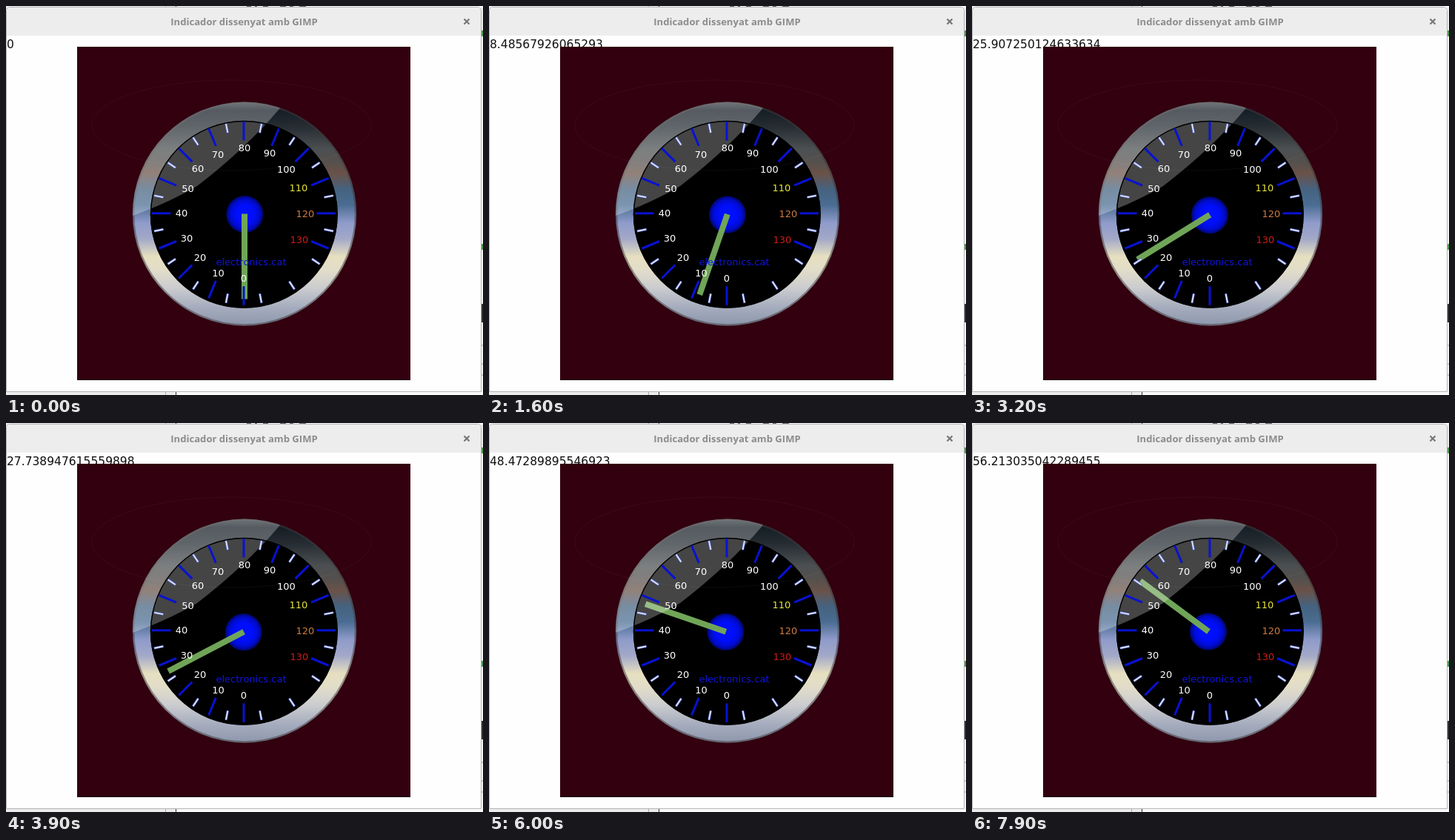
An HTML page for the animation above (8 s loop, 644 by 525 pixels).

```html
<!DOCTYPE html>
<html lang="ca">
<head>
<meta charset="utf-8">
<title>Indicador</title>
<style>
html, body { margin: 0; width: 100%; height: 100%; overflow: hidden; background: #eee; }
svg { display: block; width: 644px; height: 525px; }
.title { font: bold 13.1px "Open Sans", "Noto Sans", sans-serif; fill: #8b8c8b; text-anchor: middle; }
.value { font: 15.5px "DejaVu Sans", sans-serif; fill: #111; }
.dial { font: 13px "DejaVu Sans", sans-serif; }
#labels { text-anchor: middle; fill: #fff; }
</style>
</head>
<body>
<svg viewBox="0 0 644 525" xmlns="http://www.w3.org/2000/svg">
  <defs>
    <linearGradient id="chrome" gradientUnits="userSpaceOnUse" x1="0" y1="129" x2="0" y2="432">
      <stop offset="0" stop-color="#3a4448"/>
      <stop offset=".04" stop-color="#161e26"/>
      <stop offset=".11" stop-color="#252c32"/>
      <stop offset=".21" stop-color="#4b4f51"/>
      <stop offset=".27" stop-color="#55504d"/>
      <stop offset=".32" stop-color="#6a5248"/>
      <stop offset=".39" stop-color="#45627f"/>
      <stop offset=".46" stop-color="#4a6c92"/>
      <stop offset=".54" stop-color="#8f9bca"/>
      <stop offset=".61" stop-color="#a2a8c8"/>
      <stop offset=".69" stop-color="#e6dfc0"/>
      <stop offset=".75" stop-color="#e2ddc9"/>
      <stop offset=".83" stop-color="#cbcccf"/>
      <stop offset=".92" stop-color="#a4abbd"/>
      <stop offset="1" stop-color="#8d96ab"/>
    </linearGradient>
    <radialGradient id="hub">
      <stop offset="0" stop-color="#0010ff"/>
      <stop offset=".5" stop-color="#000efa"/>
      <stop offset=".8" stop-color="#000bcc"/>
      <stop offset="1" stop-color="#000668"/>
    </radialGradient>
    <clipPath id="rim"><circle cx="322" cy="280.5" r="151"/></clipPath>
  </defs>

  <!-- desktop behind the window -->
  <rect width="644" height="525" fill="#ececec"/>
  <path d="M230 0h414v2H230zM230 520h414v5H230z" fill="#fafafa"/>
  <path d="M215.500 0v3M215.500 520v5" stroke="#aaa"/>
  <path d="M229.500 0v2M229.500 520v5" stroke="#333"/>
  <path d="M325 .5h6M336 .5h3M347 .5h7M370 .5h8M383 .5h5M396 .5h9" stroke="#666"/>
  <path d="M642 40h2v480h-2z" fill="#f5f5f5"/>
  <path d="M642 33h2v8h-2zM642 321h2v8h-2z" fill="#4c9a4c"/>
  <path d="M642 402h2v25h-2z" fill="#333"/>
  <path d="M642 458h2M642 483h2M642 498h2" stroke="#999"/>

  <!-- window -->
  <path d="M.5 520.500V7q0-5.500 5.500-5.500h630q5.500 0 5.500 5.500v513.500z" fill="#fffeff" stroke="#b4b4b4"/>
  <path d="M1 40V7q0-5 5-5h630q5 0 5 5v33z" fill="#ededed"/>
  <text class="title" x="321.500" y="26">Indicador dissenyat amb GIMP</text>
  <path d="M618.500 17.500l7 7m0-7l-7 7" stroke="#777" stroke-width="2.200"/>
  <text class="value" id="value" x="1" y="57">0</text>

  <!-- gauge -->
  <rect x="96" y="55" width="450" height="450" fill="#32000f"/>
  <path d="M96 504.500h450" stroke="#120008"/>
  <circle cx="322" cy="280.500" r="151" fill="url(#chrome)"/>
  <circle cx="322" cy="280.500" r="150" fill="none" stroke="#40383c" stroke-opacity=".5" stroke-width="2.500"/>
  <circle cx="321.300" cy="281.300" r="126.500"/>
  <g id="needle">
    <circle cx="322.300" cy="281" r="25" fill="url(#hub)"/>
    <rect x="318" y="280.500" width="8" height="115" fill="#70a558"/>
  </g>
  <path clip-path="url(#rim)" d="M165 285Q215 268 258 243Q322 194 369 139L380 120H165z" fill="#fff" fill-opacity=".27"/>
  <circle cx="321.300" cy="281.300" r="125.800" fill="none" stroke="#000" stroke-width="1.400"/>
  <ellipse cx="304.500" cy="161" rx="188.500" ry="61" fill="none" stroke="#fff" stroke-opacity=".045"/>
  <g id="ticks"></g>
  <text class="dial" x="283.500" y="350" fill="#1014dc">electronics.cat</text>
  <g class="dial" id="labels"></g>
</svg>
<script>
const $ = id => document.getElementById(id);
const DEG = 2.25; // dial degrees per unit, clockwise from the bottom

function add(parent, tag, attrs, text) {
  const el = document.createElementNS("http://www.w3.org/2000/svg", tag);
  for (const k in attrs) el.setAttribute(k, attrs[k]);
  if (text !== undefined) el.textContent = text;
  parent.appendChild(el);
}

function tick(v, r1, r2, color, width) {
  add($("ticks"), "path", {
    d: `M321 ${279.8 + r1}V${279.8 + r2}`, stroke: color, "stroke-width": width,
    transform: `rotate(${v * DEG} 321 279.8)`
  });
}

for (let v = 0; v <= 130; v += 10) tick(v, 98.5, 124, "#0812d2", 3);
for (let v = 5; v <= 155; v += 10) {
  tick(v, 110.5, 123.5, "#5566cc", 3.2);
  tick(v, 111, 123, "#dfe6ff", 1.8);
}

const spots = [
  [321, 372], [286.5, 365], [262, 344], [244, 318], [237, 284], [245.5, 251], [259, 224],
  [286, 205], [322, 196], [356, 203], [378.5, 225], [395, 250], [404, 285], [396, 320]
];
const warn = { 110: "#e6e63c", 120: "#cc7a40", 130: "#cc1c18" };
spots.forEach(([x, y], i) => add($("labels"), "text", { x, y, fill: warn[i * 10] || "#fff" }, i * 10));

// Readings as [ms, value], joined by a monotone cubic
const keys = [
  [500, 0], [1600, 8.48567926065293], [2300, 19.31], [2600, 23.509034236901343],
  [3900, 27.738947615559898], [4800, 29.721559558066126], [5300, 37.1],
  [6000, 48.47289895546923], [6800, 53.9], [7700, 56.08], [7900, 56.213035042289455]
];
const slopes = keys.slice(1).map((k, i) => (k[1] - keys[i][1]) / (k[0] - keys[i][0]));
const tangents = keys.map((_, i) => {
  const a = slopes[Math.max(i - 1, 0)], b = slopes[Math.min(i, slopes.length - 1)];
  return 2 * a * b / (a + b);
});

function reading(t) {
  if (t < 600) return 0;
  const i = keys.findLastIndex(k => k[0] <= t);
  const [t0, v0] = keys[i];
  if (t === t0) return v0;
  const h = keys[i + 1][0] - t0, p = (t - t0) / h;
  const s = slopes[i], m = tangents[i], n = tangents[i + 1];
  return v0 + h * p * (m + p * (3 * s - 2 * m - n + p * (m + n - 2 * s)));
}

function draw() {
  const t = Math.floor(performance.now() % 8000 / 100) * 100;
  const v = reading(t);
  $("value").textContent = v;
  $("needle").setAttribute("transform", `rotate(${v * DEG} 320.5 280.4)`);
  requestAnimationFrame(draw);
}
draw();
</script>
</body>
</html>
```
